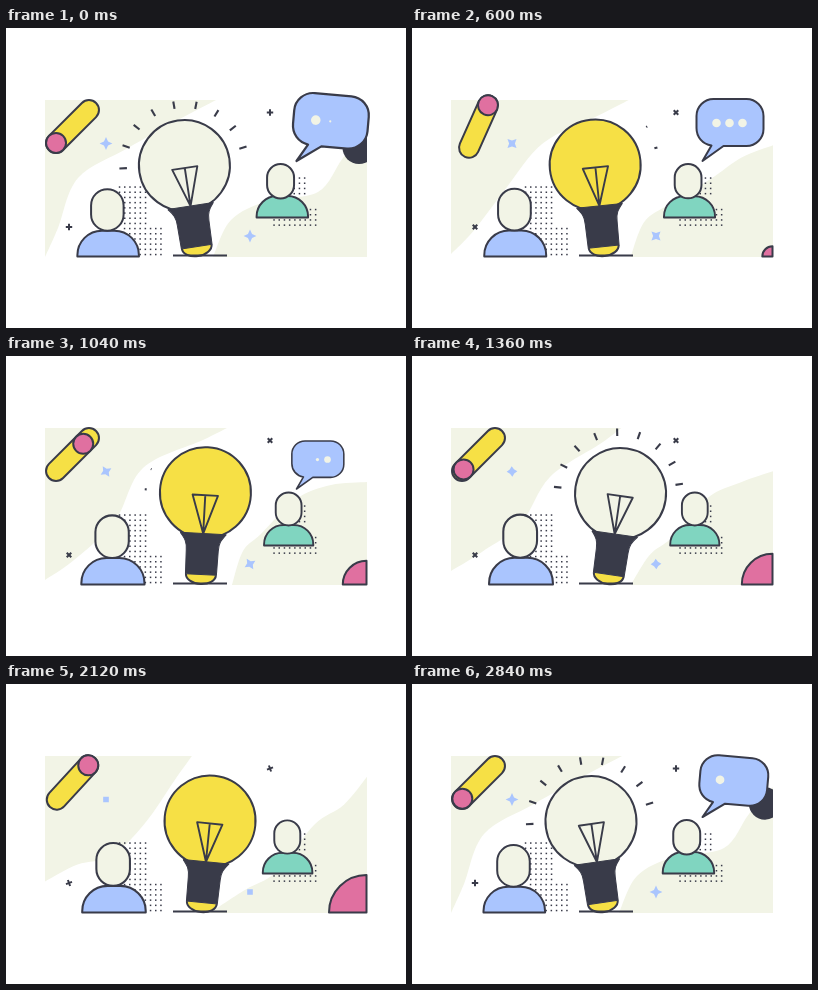
An HTML page with a canvas that plays this animation: 400x300 px, repeating every 2.88 s.

```html
<!DOCTYPE html>
<html>
<head>
<meta charset="utf-8">
<style>
html, body { margin: 0; height: 100%; overflow: hidden; background: #fff; }
canvas { display: block; }
</style>
</head>
<body>
<canvas id="stage"></canvas>
<script>
const LOOP = 2880, HALF = LOOP / 2;
const DARK = '#393b49', YELLOW = '#f6e045', PINK = '#e070a0', BLUE = '#aac5fe', GREEN = '#80d5c0', CREAM = '#f2f4e6';
const canvas = document.getElementById('stage'), c = canvas.getContext('2d');
const dpr = window.devicePixelRatio || 1;
canvas.width = 400 * dpr;
canvas.height = 300 * dpr;
canvas.style.width = '400px';
canvas.style.height = '300px';

const rad = deg => deg * Math.PI / 180;
const mix = (a, b, u) => a + (b - a) * u;
const ramp = (t, start, end) => Math.min(1, Math.max(0, (t - start) / (end - start)));
const ease = (t, start, end) => { const u = ramp(t, start, end); return u * u * (3 - 2 * u); };

function paint(fill, line = 2) {
  if (fill) { c.fillStyle = fill; c.fill(); }
  if (line) { c.strokeStyle = DARK; c.lineWidth = line; c.stroke(); }
}
function disc(x, y, r, fill, line) {
  if (r <= 0) return;
  c.beginPath();
  c.arc(x, y, r, 0, 7);
  paint(fill, line);
}
function box(x, y, w, h, radii, fill) {
  c.beginPath();
  c.roundRect(x, y, w, h, radii);
  paint(fill);
}
function segment(x1, y1, x2, y2, width = 2) {
  c.beginPath();
  c.moveTo(x1, y1);
  c.lineTo(x2, y2);
  paint(null, width);
}
function placed(x, y, angle, scale, draw) {
  c.save();
  c.translate(x, y);
  c.rotate(rad(angle));
  c.scale(scale, scale);
  draw();
  c.restore();
}

// Each background edge flows through three poses: start, middle and late in the loop.
const LEFT_EDGE = [
  [[210, 72], [172, 92], [122, 120], [72, 150], [52, 200], [39, 229]],
  [[221, 72], [197, 84], [137, 112], [109, 165], [68, 204], [39, 224]],
  [[184, 72], [168, 97], [140, 141], [108, 174], [73, 179], [39, 195]]
];
const RIGHT_EDGE = [
  [[361, 103], [337, 130], [312, 164], [262, 173], [225, 192], [207, 229]],
  [[361, 126], [325, 129], [290, 143], [255, 178], [237, 195], [226, 229]],
  [[361, 92], [338, 120], [308, 139], [271, 189], [240, 207], [203, 229]]
];
function blob(t, [start, middle, late], corner) {
  const toMiddle = ease(t, 0, 1040), toLate = ease(t, 1040, 1900), toStart = ease(t, 1980, 2840);
  const p = start.map((point, i) => point.map((v, axis) =>
    mix(mix(mix(v, middle[i][axis], toMiddle), late[i][axis], toLate), v, toStart)));
  c.beginPath();
  c.moveTo(...corner);
  c.lineTo(...p[0]);
  for (let i = 0; i < p.length - 1; i++) {
    const before = p[i - 1] || p[i], a = p[i], b = p[i + 1], after = p[i + 2] || b;
    c.bezierCurveTo(a[0] + (b[0] - before[0]) / 6, a[1] + (b[1] - before[1]) / 6,
      b[0] - (after[0] - a[0]) / 6, b[1] - (after[1] - a[1]) / 6, ...b);
  }
  paint(CREAM, 0);
}
function background(t, wake) {
  c.save();
  c.beginPath();
  c.rect(39, 72, 322, 157);
  c.clip();
  blob(t, LEFT_EDGE, [39, 72]);
  blob(t, RIGHT_EDGE, [361, 229]);
  disc(353, 119.5, 16.5 * (ease(wake, 2640, 2860) - ease(wake, 2980, 3320)), DARK, 0);
  c.restore();
}

function quarter(t) {
  const growth = 1 - (1 - ramp(t, 340, 2120)) ** 2;
  const r = 37.5 * (growth - ease(t, 2300, 2800));
  if (r < 0.5) return;
  c.beginPath();
  c.moveTo(360.5, 228.5);
  c.arc(360.5, 228.5, r, Math.PI, Math.PI * 1.5);
  c.closePath();
  paint(PINK);
}

function dots(x, y, columns, rows, step = 5.2) {
  c.fillStyle = DARK;
  for (let i = 0; i < columns; i++)
    for (let j = 0; j < rows; j++) c.fillRect(x + i * step - 0.7, y + j * step - 0.7, 1.5, 1.5);
}

function person(x, y, scale, w, h, bodyColor, headX, head) {
  placed(x, y, 0, scale, () => {
    box(-w / 2, -h, w, h, [h * 0.95, h * 0.95, 0, 0], bodyColor);
    box(headX - head.w / 2, -head.top, head.w, head.h, head.w / 2, CREAM);
  });
}

// A four-pointed star that spins, shrinks into a square and back.
function sparkle(x, y, t) {
  const square = ease(t, 900, 1900) - ease(t, 2440, 2840);
  const turn = 45 * ease(t, 0, 600) + 90 * ease(t, 700, 2100) + 45 * ease(t, 2440, 2840);
  const r = 6.4 - 2.4 * square, inner = r * (0.45 + 0.26 * square);
  placed(x, y, turn, 1, () => {
    c.beginPath();
    for (let i = 0; i < 8; i++) {
      const d = i % 2 ? inner : r, a = i * Math.PI / 4;
      c.lineTo(d * Math.cos(a), d * Math.sin(a));
    }
    c.closePath();
    paint(BLUE, 0);
  });
}
function cross(x, y, t) {
  const turn = 45 * ease(t, 0, 600) + 25 * ease(t, 1500, 2150) + 20 * ease(t, 2440, 2840);
  placed(x, y, turn, 1, () => {
    segment(-3.2, 0, 3.2, 0);
    segment(0, -3.2, 0, 3.2);
  });
}

function pencil(p) {
  const reach = 23.3;
  placed(66.5, 98.5, 135 + 180 * ease(p, 160, 720), 1, () => {
    box(-reach - 10, -10, reach * 2 + 20, 20, 10, YELLOW);
    disc(reach - 2 * reach * ease(p, 900, 1430), 0, 10, PINK, 2);
  });
}
function squiggle(p) {
  const length = 75, head = length * ease(p, 120, 290), tail = length * ease(p, 300, 520);
  if (head - tail < 0.5) return;
  c.save();
  c.setLineDash([head - tail, 200]);
  c.lineDashOffset = -tail;
  c.beginPath();
  c.moveTo(50, 136);
  c.bezierCurveTo(47, 153, 68, 157, 71, 148);
  c.bezierCurveTo(72, 139, 62, 140, 63, 151);
  c.bezierCurveTo(63, 165, 67, 174, 75, 177);
  paint(null, 1.8);
  c.restore();
}

function glass(clear) {
  c.save();
  disc(0, -91, 45.5, YELLOW, 0);
  c.clip();
  c.globalAlpha = mix(0.75, 1, clear);
  disc(0, -91 + (1 - clear) * 60, 46 * clear, CREAM, 0);
  c.restore();
  disc(0, -91, 45.5, null, 2);
}
function socket() {
  c.beginPath();
  c.moveTo(-23, -50);
  c.lineTo(23, -50);
  c.bezierCurveTo(18, -44, 16, -41, 16, -33);
  c.lineTo(15.5, -9);
  c.lineTo(-15.5, -9);
  c.lineTo(-16, -33);
  c.bezierCurveTo(-16, -41, -18, -44, -23, -50);
  paint(DARK, 1);
}
function filament() {
  c.beginPath();
  c.moveTo(0, -50);
  c.lineTo(-12.7, -88.5);
  c.lineTo(12.7, -88.5);
  c.closePath();
  c.lineTo(0, -88.5);
  paint(null, 1.9);
}
function rays(x, y, turn, p) {
  const appearing = p > HALF / 2;
  for (let i = 0; i < 9; i++) {
    const outer = appearing ? ramp(p, 1000 + i * 25, 1160 + i * 25) : 1;
    const inner = appearing ? 0 : ramp(p, 215 + i * 38, 355 + i * 38);
    if (outer - inner < 0.02) continue;
    placed(x, y, turn + (i - 4) * 20.7, 1, () =>
      segment(57.5 + inner * 7.5, 0, 57.5 + outer * 7.5, 0, 2.1));
  }
}
function bulb(sway, p) {
  const tilt = 9 * sway, x = 193.8 + 1.8 * sway;
  const clear = p > HALF / 2 ? ease(p, 1060, 1370) : 1 - ease(p, 230, 560);
  placed(x, 227.5, tilt, 1, () => {
    c.beginPath();
    c.ellipse(0, -9, 15, 9.5, 0, 0, Math.PI);
    paint(YELLOW);
    glass(clear);
    socket();
    filament();
  });
  segment(167, 227.5, 221, 227.5);
  const cx = x + 91 * Math.sin(rad(tilt)), cy = 227.5 - 91 * Math.cos(rad(tilt));
  rays(cx - 1 - sway, cy, 264.5 + 4.5 * sway, p);
}

function bubble(s) {
  const scale = 1.13 * ease(s, 2600, 2900) - 0.13 * ease(s, 2960, 3160) - ease(s, 3780, 4240);
  if (scale < 0.02) return;
  placed(290.5, 133, 5 * (1 - ease(s, 2900, 3160)), scale, () => {
    c.beginPath();
    c.moveTo(0, 0);
    c.lineTo(9, -15.5);
    c.bezierCurveTo(0, -17, -6, -24, -6, -33);
    c.lineTo(-6, -45);
    c.arcTo(-6, -62, 11, -62, 17);
    c.arcTo(61, -62, 61, -45, 17);
    c.arcTo(61, -15, 44, -15, 17);
    c.lineTo(21, -15);
    c.closePath();
    paint(BLUE);
    for (let i = 0; i < 3; i++) {
      const size = ease(s, 2740 + i * 110, 2840 + i * 110) - ease(s, 3760 + i * 100, 3880 + i * 100);
      disc(14 + i * 13, -38, 4.3 * size, CREAM, 0);
    }
  });
}

function draw(t) {
  const p = t % HALF;
  const wake = t < HALF ? t + LOOP : t;
  const s = t < 150 ? t + LOOP : t;
  const back = ease(s, 1800, 2980);
  const shift = ease(s, 280, 1510) - back, quickShift = ease(s, 400, 1100) - back;
  c.setTransform(dpr, 0, 0, dpr, 0, 0);
  c.fillStyle = '#fff';
  c.fillRect(0, 0, 400, 300);
  c.lineJoin = 'round';

  background(t, wake);
  quarter(t);
  dots(113.5, 159, 6, 8);
  dots(118.5, 200.5, 8, 6);
  dots(283, 150, 4, 4);
  dots(268, 181.5, 9, 4);
  sparkle(100, 115.5, t);
  sparkle(244, 208, t);
  cross(264, 84.5, t);
  cross(63, 199, t);
  squiggle(p);
  pencil(p);
  person(102 + 7.3 * shift, 228.5, 1 + 0.04 * shift, 61.5, 25.8, BLUE, -0.8, { w: 32.5, h: 41.5, top: 67.3 });
  person(276.2 + 6.6 * quickShift, 189.5, 1 - 0.045 * quickShift, 51.5, 21.5, GREEN, -1.8 + 1.8 * quickShift,
    { w: 27, h: 34.5, top: 53.5 + 2 * quickShift });
  bulb(2 * shift - 1, p);
  bubble(wake);
}

function frame() {
  draw(performance.now() % LOOP);
  requestAnimationFrame(frame);
}
frame();
</script>
</body>
</html>
```
